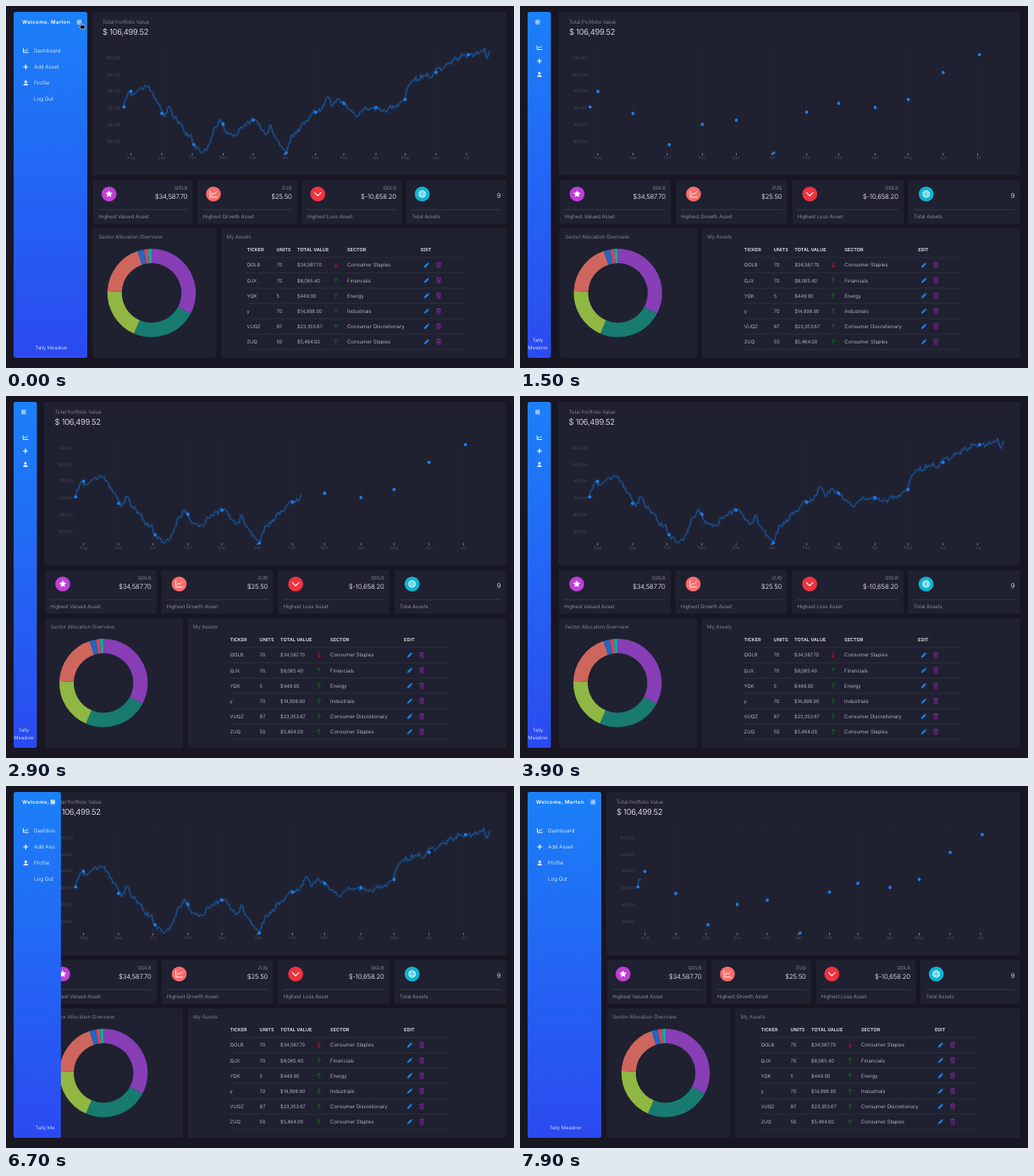
Write an HTML page that moves like this. It is 600 px wide and 428 px high and loops after 8000 ms.

```html
<!DOCTYPE html>
<html lang="en">
<head>
<meta charset="utf-8">
<title>Portfolio dashboard</title>
<style>
  html, body { margin: 0; width: 100%; height: 100%; overflow: hidden; background: #191623; }
  svg { display: block; width: 100vw; height: 100vh; }
  text { font-family: Inter, "Open Sans", sans-serif; font-weight: 300; text-rendering: geometricPrecision; }
  .strong { font-weight: 600; }
  .line { fill: none; stroke-linecap: round; stroke-linejoin: round; }
</style>
</head>
<body>
<svg id="stage" viewBox="0 0 600 428">
  <defs>
    <linearGradient id="blue" x1="0" y1="0" x2="0" y2="1">
      <stop offset="0" stop-color="#1b80f8"/><stop offset="1" stop-color="#2b4af0"/>
    </linearGradient>
    <clipPath id="plot"><rect x="0" y="40" width="600" height="135.5"/></clipPath>
    <clipPath id="menu"><rect id="menuArea" x="9" y="7" height="409"/></clipPath>
  </defs>
</svg>
<script>
const LOOP = 8000;
const CARD = '#1f2130', DIM = '#575b70', SOFT = '#9a9ca8', PALE = '#d6d7de', WHITE = '#ffffff';
const stage = document.getElementById('stage');
const menuArea = document.getElementById('menuArea');
const movers = [];

function el(tag, attrs, parent = stage) {
  const node = document.createElementNS('http://www.w3.org/2000/svg', tag);
  for (const k in attrs) node.setAttribute(k, attrs[k]);
  parent.appendChild(node);
  return node;
}
const group = (parent, x = 0, y = 0) => el('g', { transform: `translate(${x} ${y})` }, parent);
const stroke = (parent, d, color, width) =>
  el('path', { d, class: 'line', stroke: color, 'stroke-width': width }, parent);
const shape = (parent, d, fill) => el('path', { d, fill }, parent);

function label(parent, x, y, str, size = 6, fill = PALE, more = {}) {
  el('text', { x, y, 'font-size': size, fill, ...more }, parent).textContent = str;
}
const END = { 'text-anchor': 'end' }, MID = { 'text-anchor': 'middle' };

// Everything in the content area depends on p: 0 = menu narrow, 1 = menu wide.
const mix = (a, b) => p => a + (b - a) * p;

function slide(x, parent = content) {
  const g = el('g', {}, parent);
  movers.push(p => g.setAttribute('transform', `translate(${x(p)} 0)`));
  return g;
}
function span(y, h, left, right, fill, rx = 0) {
  const r = el('rect', { y, height: h, fill, rx }, content);
  movers.push(p => {
    r.setAttribute('x', left(p));
    r.setAttribute('width', right(p) - left(p));
  });
}

const content = group(stage);
const rightEdge = () => 590.5;

// Portfolio chart
span(7, 193, mix(45, 102), rightEdge, CARD, 2);
const heading = slide(mix(57.5, 114));
label(heading, 0, 21.2, 'Total Portfolio Value', 6, SOFT);
label(heading, 0, 34.2, '$ 106,499.52', 9.5, WHITE, { 'letter-spacing': -0.25 });

const plotX = (wideX, p) => {
  const left = 82 + 57 * p;
  return left + (wideX - 139) / 432 * (571 - left);
};
const axis = slide(mix(79, 135.5));
for (let i = 0; i < 6; i++) label(axis, 0, 62.7 + i * 19.8, `${105 - i * 5},000`, 4.8, DIM, END);

const MONTHS = 'Aug Sep Oct Nov Dec Jan Feb Mar Apr May Jun Jul'.split(' ');
const monthX = [147.5, 184, 220, 256.5, 292, 329, 365.5, 399, 437, 471.5, 508, 544];
const dotY = [101, 127, 164, 140, 135, 174, 125.5, 115, 120, 110.5, 78.5, 57.5];
MONTHS.forEach((name, i) => {
  const g = slide(p => plotX(monthX[i], p));
  stroke(g, 'M0 49V174', '#272938', 0.6);
  stroke(g, 'M0 174.5V176', '#a5a7b0', 0.8);
  label(g, 0, 181.2, name, 5, DIM, MID);
});

const knots = [119, 102, 105, 99, 97, 95, 109, 116, 131, 119, 133, 137, 149, 153, 164, 172, 169, 162,
  143, 134, 147, 151, 153, 143, 142, 136, 134, 146, 152, 141, 156, 165, 174, 153, 151, 140, 136, 128,
  124, 122, 108, 119, 110, 112, 120, 126, 131, 123, 121, 121, 122, 125, 122, 118, 119, 112, 95, 87,
  87, 82, 83, 80, 73, 73, 67, 64, 61, 57, 59, 57, 56, 50];
let seed = 11;
const random = () => (seed = seed * 16807 % 2147483647) / 2147483647;
const points = [];
knots.forEach((y, i) => {
  points.push([139 + i * 6, y]);
  if (i === knots.length - 1) return;
  for (let j = 1; j < 4; j++) {
    const f = j / 4;
    points.push([139 + (i + f) * 6, Math.min(174, y + (knots[i + 1] - y) * f + (random() - 0.5) * 7)]);
  }
});
points.push([566.5, 57], [568, 62], [569.5, 59], [571, 54]);

const plot = el('g', { 'clip-path': 'url(#plot)' }, content);
const traces = [[5, 0.06], [2.4, 0.1], [0.75, 1]].map(([w, o]) =>
  el('path', { class: 'line', stroke: '#1c6cc6', 'stroke-width': w, opacity: o }, plot));
function drawLine(p, from, to) {
  const d = points.slice(from, to).map(([x, y], i) => `${i ? 'L' : 'M'}${plotX(x, p).toFixed(2)} ${y.toFixed(2)}`).join('');
  traces.forEach(t => t.setAttribute('d', d));
}
const dot = (x, y) => el('circle', { cy: y, r: 1.9, fill: '#1f7cec' }, slide(p => plotX(x, p), plot));
dot(139.3, 119.3);
monthX.forEach((x, i) => dot(x + ([2, 5, 11].includes(i) ? 2 : 0), dotY[i]));

// Summary cards
const icons = {
  star(g) {
    let d = '';
    for (let i = 0; i < 10; i++) {
      const a = i * Math.PI / 5, r = i % 2 ? 2.2 : 4.4;
      d += `${i ? 'L' : 'M'}${r * Math.sin(a)} ${-r * Math.cos(a)}`;
    }
    shape(g, d + 'Z', WHITE);
  },
  chart(g) { stroke(g, 'M-4-4V3.6H4.2M-2.4 1.2L-.5-1.2L1 .2L3.8-3', WHITE, 0.9); },
  down(g) { stroke(g, 'M-3.8-1.6L0 2L3.8-1.6', WHITE, 1.1); },
  globe(g) {
    el('circle', { r: 3.9, fill: 'none', stroke: WHITE, 'stroke-width': 0.9 }, g);
    el('ellipse', { rx: 1.7, ry: 3.9, fill: 'none', stroke: WHITE, 'stroke-width': 0.7 }, g);
    stroke(g, 'M-3.7-1.3H3.7M-3.7 1.3H3.7', WHITE, 0.7);
  }
};
const GAP = 5.7;
const cardW = p => (590.5 - (46 + 57 * p) - 3 * GAP) / 4;
[['QOLB', '$34,587.70', 'Highest Valued Asset', '#c03fd8', 'star'],
 ['ZUQ', '$25.50', 'Highest Growth Asset', '#fb6c6b', 'chart'],
 ['QOLB', '$-10,658.20', 'Highest Loss Asset', '#f2323f', 'down'],
 ['', '9', 'Total Assets', '#10b4d2', 'globe']
].forEach(([ticker, value, name, color, icon], i) => {
  const left = p => 46 + 57 * p + i * (cardW(p) + GAP);
  const right = p => left(p) + cardW(p);
  span(206, 51.5, left, right, CARD, 2);
  span(240.6, 0.6, p => left(p) + 6, p => right(p) - 6, '#454755');
  const badge = group(slide(p => left(p) + 21 - 2.3 * p), 0, 222.3);
  el('circle', { r: 8.8, fill: color }, badge);
  icons[icon](badge);
  label(slide(p => left(p) + 6.3), 0, 251, name, 6, '#a9abb5');
  const r = slide(p => right(p) - 6.2);
  label(r, 0, 217, ticker, 5.7, SOFT, END);
  label(r, 0, ticker ? 227.8 : 226.8, value, 7.7, WHITE, { ...END, 'letter-spacing': -0.1 });
});

// Sector ring
span(263, 153, mix(46, 102.5), mix(209, 248.5), CARD, 2);
label(slide(mix(53, 109.5)), 0, 275.2, 'Sector Allocation Overview', 6, SOFT);
const ring = group(slide(mix(115.2, 172)), 0, 339.3);
let start = 0;
const polar = (r, deg) => {
  const a = deg * Math.PI / 180;
  return `${r * Math.sin(a)} ${-r * Math.cos(a)}`;
};
[[118, '#873eb6'], [203.6, '#187b70'], [272.5, '#90b743'], [341.5, '#cf665d'],
 [350, '#2366c4'], [355, '#dc4256'], [360, '#14a99c']].forEach(([end, color]) => {
  shape(ring, `M${polar(52.2, start)}A52.2 52.2 0 0 1 ${polar(52.2, end)}L${polar(35.2, end)}A35.2 35.2 0 0 0 ${polar(35.2, start)}Z`, color);
  start = end;
});

// Asset table
span(263, 153, mix(214.5, 254), rightEdge, CARD, 2);
label(slide(mix(221, 260.5)), 0, 275.2, 'My Assets', 6, SOFT);
const table = slide(mix(264.6, 284.5));
[[0, 'TICKER'], [35, 'UNITS'], [59.5, 'TOTAL VALUE'], [118.5, 'SECTOR'], [205.5, 'EDIT']]
  .forEach(([x, s]) => label(table, x, 289.5, s, 5.5, '#e4e5ea', { class: 'strong' }));
stroke(table, 'M0 297.2H257', '#383a49', 0.6);
[['QOLB', 70, '$34,587.70', 'Consumer Staples'],
 ['QJX', 70, '$8,065.40', 'Financials'],
 ['YQK', 5, '$449.90', 'Energy'],
 ['y', 70, '$14,998.90', 'Industrials'],
 ['VUQZ', 87, '$23,353.67', 'Consumer Discretionary'],
 ['ZUQ', 50, '$5,464.00', 'Consumer Staples']
].forEach(([ticker, units, total, sector], i) => {
  const row = group(table, 0, 306.3 + i * 18.12);
  label(row, 0, 2.1, ticker, 5.8);
  label(row, 35, 2.1, units, 5.8);
  label(row, 59.5, 2.1, total, 5.8, PALE, { 'letter-spacing': -0.1 });
  label(row, 118.5, 2.1, sector, 6);
  const arrow = group(row, 105.2, 0);
  if (i) stroke(arrow, 'M0 2.8V-2.6M-2.3-.4L0-2.7L2.3-.4', '#0a6c11', 1);
  else stroke(arrow, 'M0-2.8V2.6M-2.3.4L0 2.7L2.3.4', '#b81424', 1);
  shape(group(row, 212.3, 0), 'M-3.2 3.2L-2.7 1L1-2.7L2.7-1L-1 2.7ZM1.5-3.1L2.1-3.5L3.5-2.1L3.1-1.5Z', '#1b7de6');
  stroke(group(row, 226.5, 0), 'M-2.6-2.3H2.6M-1-3.2H1M-2-2.2L-1.7 3.2H1.7L2-2.2M-.7-.4L.7 1.4M.7-.4L-.7 1.4', '#8a2aa2', 0.75);
  stroke(row, 'M0 9.1H257', '#343645', 0.6);
});

// Side menu
const sidebar = el('rect', { x: 9, y: 7, height: 409, rx: 2.5, fill: 'url(#blue)' });
function menuIcons(parent, ys) {
  const chart = group(parent, 0, ys[0]);
  stroke(chart, 'M-2.8-2.3V2.3H3M-1.4.5L-.2-.8L.8.2L2.6-1.6', WHITE, 0.9);
  stroke(group(parent, 0, ys[1]), 'M0-2.4V2.4M-2.4 0H2.4', WHITE, 1.2);
  const user = group(parent, 0, ys[2]);
  el('circle', { cy: -1.4, r: 1.5, fill: WHITE }, user);
  shape(user, 'M-2.7 2.8C-2.7.2 2.7.2 2.7 2.8Z', WHITE);
}
const burger = group(stage);
stroke(burger, 'M-2.3-2.1H2.3M-2.3-.7H2.3M-2.3.7H2.3M-2.3 2.1H2.3', WHITE, 0.75);

const wideMenu = el('g', { 'clip-path': 'url(#menu)' });
label(wideMenu, 19, 21.2, 'Welcome, Marlon', 6, WHITE, { class: 'strong', 'letter-spacing': 0.42 });
menuIcons(group(wideMenu, 23.3, 0), [52.6, 72, 91]);
['Dashboard', 'Add Asset', 'Profile', 'Log Out']
  .forEach((s, i) => label(wideMenu, 33, 54.7 + i * 19.2, s, 6.2, WHITE));
label(wideMenu, 53.5, 406.2, 'Tally Meadow', 5.8, WHITE, MID);

const slimMenu = group(stage);
menuIcons(slimMenu, [49.2, 65, 81]);
label(slimMenu, -2, 397.3, 'Tally', 5.8, WHITE, MID);
label(slimMenu, -2, 406.2, 'Meadow', 5.8, WHITE, MID);

// Link address and pointers
const status = group(stage);
el('rect', { y: 422.5, width: 124, height: 5.5, fill: '#0d0c12' }, status);
label(status, 1, 427, 'https://tallymeadow-778bebda714a.herokuapp.com/dashboard', 4.1, WHITE, { class: 'strong' });

const arrowCursor = group(stage), handCursor = group(stage);
el('path', { d: 'M-1.8-4V3.6L0 2L1.3 5L2.6 4.4L1.3 1.5H3.7Z', fill: '#0b0b0e', stroke: WHITE, 'stroke-width': 0.7 }, arrowCursor);
el('path', {
  d: 'M-1.8-3.6C-1-4.2-.5-3.8-.5-3V-.6L2.6 0Q3.6.4 3.3 1.8L2.6 4.3H-1.2L-3.3 1.4C-3 .4-2.3.6-1.9 1Z',
  fill: '#0b0b0e', stroke: WHITE, 'stroke-width': 0.6
}, handCursor);

// Timing
const clamp = v => Math.max(0, Math.min(1, v));
function ease(v) {
  v = clamp(v);
  let lo = 0, hi = 1, s = v;
  for (let i = 0; i < 20; i++) {
    s = (lo + hi) / 2;
    const x = 0.75 * s * (1 - s) + s ** 3;
    if (x < v) lo = s; else hi = s;
  }
  return 0.3 * s * (1 - s) ** 2 + 3 * s * s * (1 - s) + s ** 3;
}
const show = (node, on) => node.setAttribute('display', on ? 'inline' : 'none');
const place = (node, x, y) => node.setAttribute('transform', `translate(${x} ${y})`);

const CLOSE = 810, OPEN = 6560;      // menu clicks
const SHRINK = 1062, GROW = 6895;    // content starts to follow
const MOVE = 500, TRACE = 1900;

function render(t) {
  const menu = 1 - ease((t - CLOSE) / MOVE) + ease((t - OPEN) / MOVE);
  const p = 1 - ease((t - SHRINK) / MOVE) + ease((t - GROW) / MOVE);
  const slim = t >= CLOSE && t < OPEN;
  const width = 27.5 + 59.5 * menu, mid = 9 + width / 2;

  movers.forEach(move => move(p));
  sidebar.setAttribute('width', width);
  menuArea.setAttribute('width', Math.max(0, width - 14 * (1 - menu)));
  show(wideMenu, !slim);
  show(slimMenu, slim);
  place(slimMenu, mid + 0.2, 0);
  place(burger, slim ? mid - 2 : width - 0.7, 19);

  const n = points.length;
  const traced = start => Math.floor(clamp((t - start) / TRACE) * n);
  if (t < SHRINK) drawLine(p, 0, n);
  else if (t < GROW) drawLine(p, 0, traced(1860));
  else if (t < 7200) drawLine(p, n - 5, n);
  else drawLine(p, 0, traced(7880));

  show(status, t >= 7000 && t < 7500);
  show(handCursor, t < 1000 || (t >= 5600 && t < 6700));
  place(handCursor, t < 1000 ? 90 : 24.5, t < 1000 ? 23 : 26);
  show(arrowCursor, (t >= 1000 && t < 1400) || (t >= 5200 && t < 5600));
  const k = clamp((t - 5200) / 400);
  place(arrowCursor, t < 2000 ? 88 : 40 - 16 * k, t < 2000 ? 22 : 4 + 20 * k);
}

function tick() {
  render(performance.now() % LOOP);
  requestAnimationFrame(tick);
}
tick();
</script>
</body>
</html>
```
